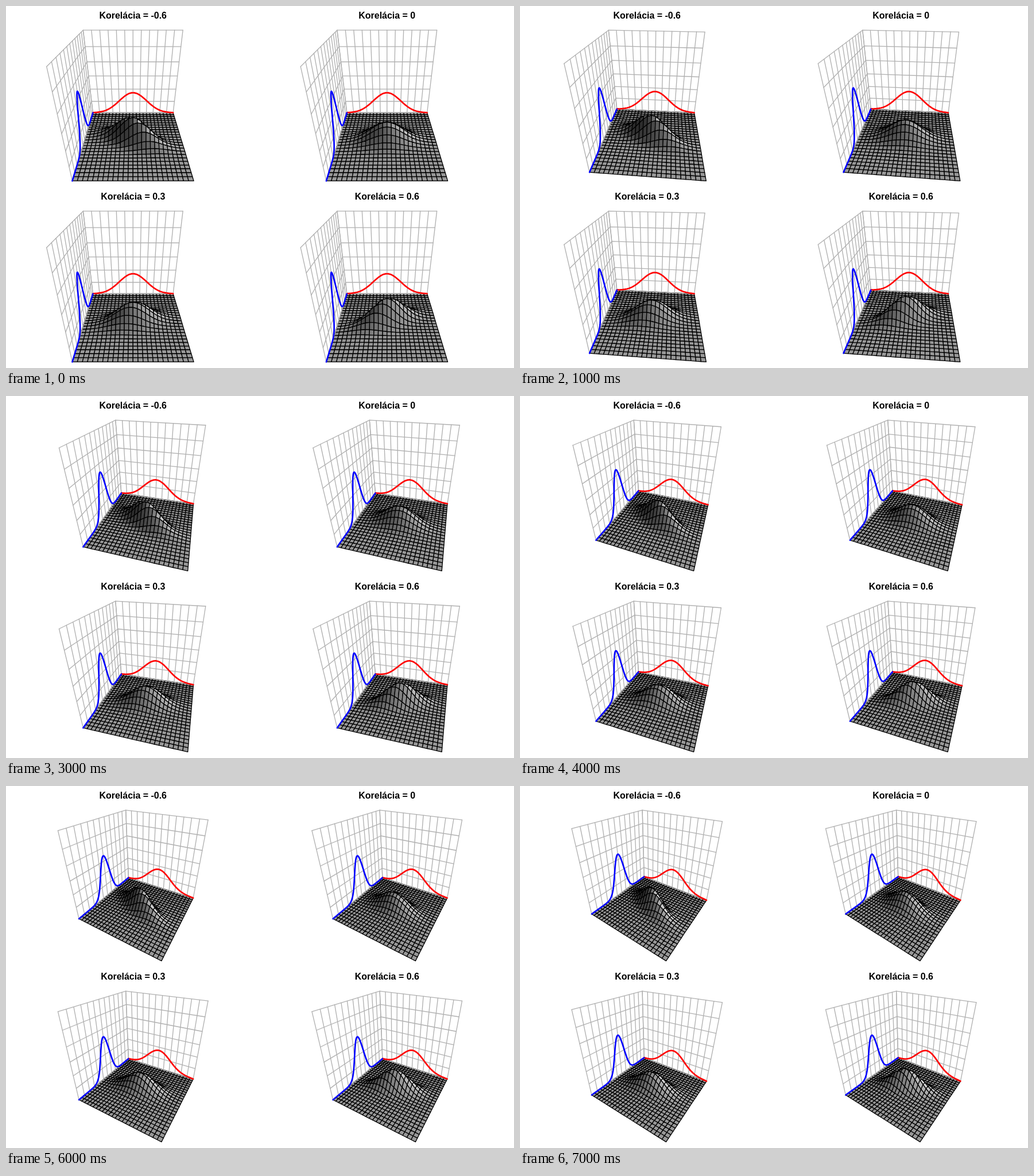
An HTML page with a canvas for the animation above (8 s loop, 885 by 632 pixels).

```html
<!DOCTYPE html>
<html lang="sk">
<head>
<meta charset="utf-8">
<style>
html, body { margin: 0; width: 885px; height: 632px; overflow: hidden; background: #fff; }
canvas { display: block; }
</style>
</head>
<body>
<canvas id="stage" width="885" height="632"></canvas>
<script>
const ctx = document.getElementById('stage').getContext('2d');
const CELLS = 24, Z_MAX = 1.4, SD_X = 1, SD_Y = 0.5;
const PHI = Math.PI / 6, DISTANCE = Math.sqrt(3) + 2;
const TOP = 42.2, BOTTOM = 305.4, LINE = 1.33;
const LIGHT = [Math.sin(2 * Math.PI / 3), -Math.cos(2 * Math.PI / 3)];
const SHADE = 0.75;

const normal = (t, sd) => Math.exp(-t * t / (2 * sd * sd)) / (sd * Math.sqrt(2 * Math.PI));

function bivariate(x, y, rho) {
  const u = x / SD_X, v = y / SD_Y, k = 1 - rho * rho;
  return Math.exp(-(u * u - 2 * rho * u * v + v * v) / (2 * k)) /
    (2 * Math.PI * SD_X * SD_Y * Math.sqrt(k));
}

// Perspective view of the box x, y in [-3, 3], z in [0, Z_MAX], fitted to the panel height
function makeView(theta, centreX, offsetY) {
  const c = Math.cos(theta), s = Math.sin(theta), cp = Math.cos(PHI), sp = Math.sin(PHI);
  const raw = (x, y, z) => {
    x /= 3; y /= 3; z = 2 * z / Z_MAX - 1;
    const near = x * s - y * c, depth = DISTANCE - z * sp - near * cp;
    return [(x * c + y * s) / depth, (z * cp - near * sp) / depth];
  };
  const xs = [], ys = [];
  for (const x of [-3, 3]) for (const y of [-3, 3]) for (const z of [0, Z_MAX]) {
    const p = raw(x, y, z);
    xs.push(p[0]);
    ys.push(p[1]);
  }
  const top = Math.max(...ys), scale = (BOTTOM - TOP) / (top - Math.min(...ys));
  const middle = (Math.min(...xs) + Math.max(...xs)) / 2;
  return (x, y, z) => {
    const p = raw(x, y, z);
    return [centreX + (p[0] - middle) * scale, offsetY + TOP + (top - p[1]) * scale];
  };
}

function trace(points) {
  ctx.beginPath();
  for (const p of points) ctx.lineTo(p[0], p[1]);
}

function polyline(points, colour, width) {
  trace(points);
  ctx.strokeStyle = colour;
  ctx.lineWidth = width;
  ctx.stroke();
}

function facetColour(slopeX, slopeY) {
  const dot = -(slopeX * LIGHT[0] + slopeY * LIGHT[1]) / Math.hypot(slopeX, slopeY, 1);
  const grey = Math.round(255 * Math.pow((1 + dot) / 2, SHADE));
  return `rgb(${grey},${grey},${grey})`;
}

function drawSurface(view, rho) {
  const at = i => -3 + 6 * i / CELLS;
  const slopeUnit = CELLS / (2 * Z_MAX);
  ctx.strokeStyle = '#000';
  ctx.lineWidth = LINE;
  for (let j = CELLS - 1; j >= 0; j--) for (let i = 0; i < CELLS; i++) {
    const corners = [[i, j], [i + 1, j], [i + 1, j + 1], [i, j + 1]].map(([a, b]) => {
      const x = at(a), y = at(b);
      return [x, y, bivariate(x, y, rho)];
    });
    const [a, b, c, d] = corners.map(p => p[2]);
    trace(corners.map(p => view(...p)));
    ctx.closePath();
    ctx.fillStyle = facetColour((b + c - a - d) * slopeUnit, (c + d - a - b) * slopeUnit);
    ctx.fill();
    ctx.stroke();
  }
}

function drawWalls(view) {
  const grid = (...points) => polyline(points.map(p => view(...p)), '#b0b0b0', LINE);
  for (let t = -3; t <= 3; t += 0.5) {
    grid([t, 3, 0], [t, 3, Z_MAX]);
    grid([-3, t, 0], [-3, t, Z_MAX]);
  }
  for (let k = 0; k <= 6; k++) {
    const z = Z_MAX * k / 6;
    grid([-3, -3, z], [-3, 3, z], [3, 3, z]);
  }
}

function drawMarginals(view) {
  const ts = Array.from({ length: 121 }, (_, i) => -3 + i / 20);
  polyline(ts.map(t => view(t, 3, normal(t, SD_X))), '#f00', 2 * LINE);
  polyline(ts.map(t => view(-3, t, normal(t, SD_Y))), '#00f', 2 * LINE);
}

function draw(theta) {
  ctx.fillStyle = '#fff';
  ctx.fillRect(0, 0, 885, 632);
  ctx.lineJoin = ctx.lineCap = 'round';
  ctx.font = 'bold 15.94px "Liberation Sans", Arial, sans-serif';
  ctx.textAlign = 'center';
  [-0.6, 0, 0.3, 0.6].forEach((rho, n) => {
    const x = 221.25 + 442.5 * (n % 2), y = n < 2 ? 0 : 316;
    const view = makeView(theta, x, y);
    drawSurface(view, rho);
    drawWalls(view);
    drawMarginals(view);
    ctx.fillStyle = '#000';
    ctx.fillText(`Korelácia = ${rho}`, x, y + 21.7);
  });
}

let shown = -1;
function tick() {
  const step = Math.floor(performance.now() / 1000) % 8;
  if (step !== shown) {
    shown = step;
    draw(step * 5 * Math.PI / 180);
  }
  requestAnimationFrame(tick);
}
tick();
</script>
</body>
</html>
```
